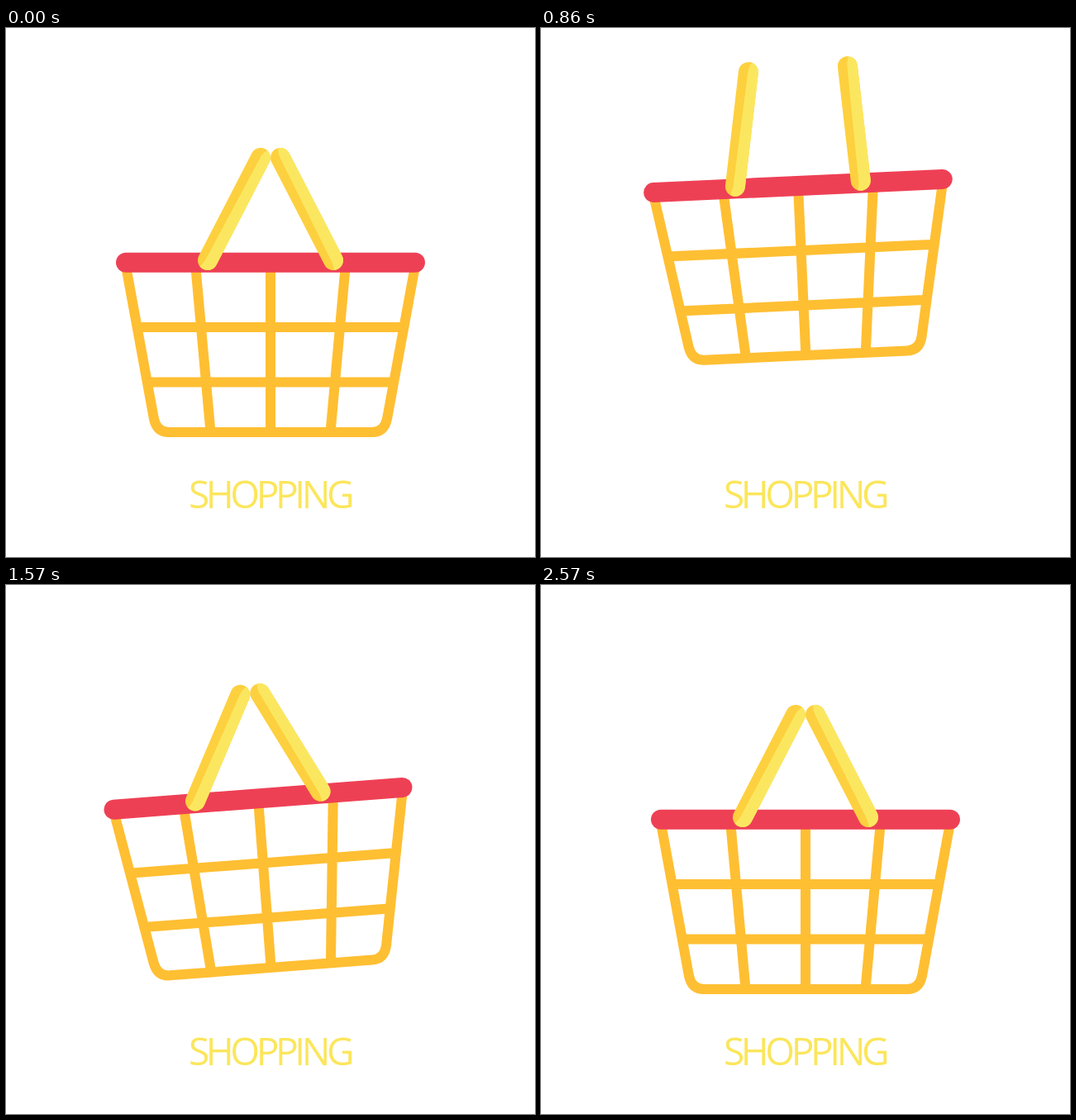
Animation of 640x640 px, one loop 4.78 s. Source, as an HTML page:

```html
<!DOCTYPE html>
<html lang="en">
<head>
<meta charset="utf-8">
<title>Shopping basket</title>
<style>
  html, body { margin: 0; width: 100%; height: 100%; overflow: hidden; background: #fff; }
  svg { display: block; width: 100%; height: 100%; }
  .mesh { fill: none; stroke: #ffbf33; stroke-width: 12; }
  .rim { stroke: #ee4055; stroke-width: 24; stroke-linecap: round; }
  .label {
    font: 400 46px "Open Sans", "Noto Sans", "DejaVu Sans", sans-serif;
    font-stretch: ultra-condensed;
    letter-spacing: -4.4px;
    fill: #fbe65c;
    text-anchor: middle;
  }
</style>
</head>
<body>
<svg viewBox="0 0 640 640">
  <defs>
    <g id="handle">
      <path d="M0 0V-139.5" stroke="#fdd03f" stroke-width="24" stroke-linecap="round"/>
      <path fill="#fbe75f" d="M3-151.1Q-.5-146-.5-138L-2.5 0Q-3 7-5 10.9A12 12 0 0 0 12 0V-139.5A12 12 0 0 0 3-151.1Z"/>
    </g>
  </defs>
  <g id="basket">
    <path class="mesh" d="M144.5 285L179 473Q182.5 489 197 489H443Q457.5 489 461 473L495.5 285
      M158 362H482M170 428.5H470M229 285L247.5 489M320 285V489M411 285L392.5 489"/>
    <path class="rim" d="M145 283.75H495"/>
    <use id="left" href="#handle"/>
    <use id="right" href="#handle"/>
  </g>
  <text class="label" x="319" y="581">SHOPPING</text>
</svg>
<script>
const LOOP = 4780, FPS = 14, CLOSED = 27.3;

// Rocking: each swing is half a sine wave.
const swings = [
  { from: 0, to: 11, tilt: 3.51, hop: 0 },
  { from: 11, to: 16, tilt: -4.46, hop: 0 },
  { from: 16, to: 20, tilt: 3.19, hop: 0 },
  { from: 20, to: 25, tilt: -4.6, hop: 18 },
  { from: 25, to: 31, tilt: 3.1, hop: 2 },
  { from: 31, to: 36, tilt: -1.4, hop: 2 }
];

const ease = u => (1 - Math.cos(Math.PI * Math.min(1, Math.max(0, u)))) / 2;

// Rises from 0 to 1 at the peak, then falls back to 0.
const bump = (k, from, peak, to) =>
  k < peak ? ease((k - from) / (peak - from)) : ease((to - k) / (to - peak));

const move = (id, value) => document.getElementById(id).setAttribute("transform", value);

function draw(ms) {
  const k = Math.floor((ms % LOOP + 5) * FPS / 1000);
  const swing = swings.find(s => k < s.to);
  const wave = swing ? Math.sin(Math.PI * (k - swing.from) / (swing.to - swing.from)) : 0;
  const tilt = swing ? swing.tilt * wave : 0;
  const hop = swing ? swing.hop * wave : 0;
  const lean = Math.abs(tilt);

  // Tilting lifts the basket onto its lower corner.
  const x = .45 * tilt + .7 * lean;
  const y = -2.04 * lean - hop - 120 * bump(k, 4.87, 10, 15.75);
  const left = CLOSED - 18.1 * bump(k, 5.26, 12, 17.5);
  const right = CLOSED - 24.8 * bump(k, 2.17, 11, 17.5);

  move("basket", `translate(${x} ${y}) rotate(${tilt} 320 495)`);
  move("left", `translate(244 281) rotate(${left})`);
  move("right", `translate(396 281) rotate(${-right})`);
}

const start = performance.now();
function tick() {
  draw(performance.now() - start);
  requestAnimationFrame(tick);
}
tick();
</script>
</body>
</html>
```
